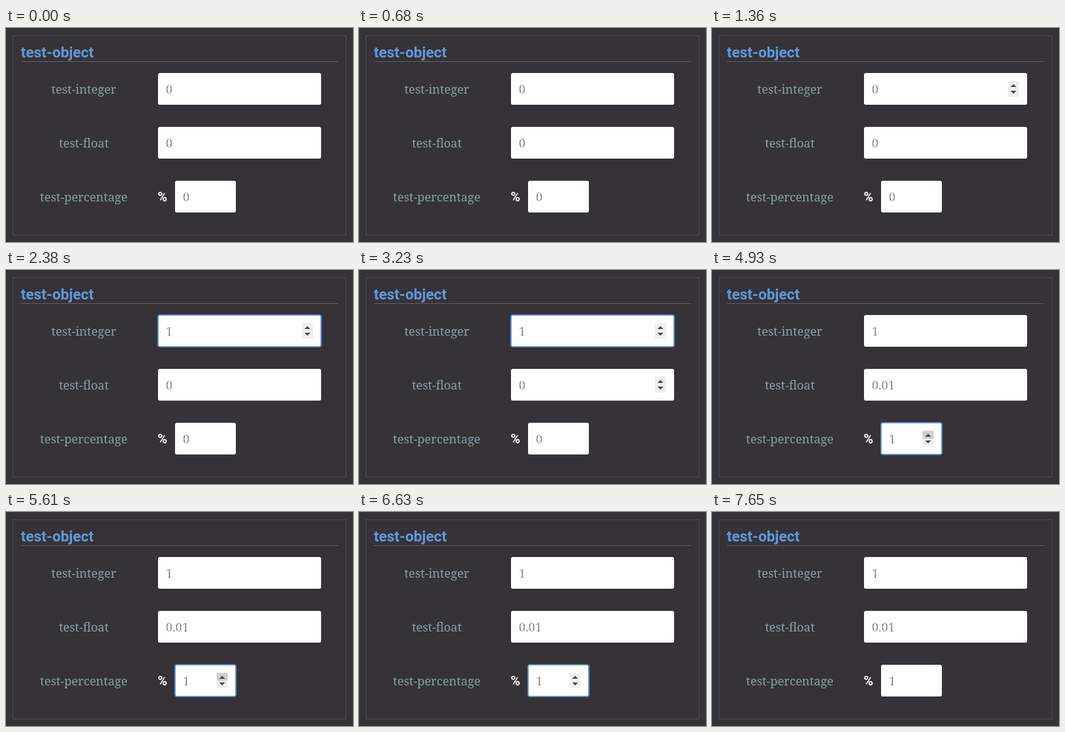
An HTML page that plays this animation: 468x290 px, repeating every 7820 ms.

```html
<!DOCTYPE html>
<html lang="en">
<head>
<meta charset="utf-8">
<title>Number inputs</title>
<style>
html, body { margin: 0; width: 100%; height: 100%; overflow: hidden; background: #353337; }
svg { display: block; width: 468px; height: 290px; }
.title { font: 700 20px Roboto, sans-serif; fill: #6098dc; }
.label { font: 400 16.2px "Roboto Slab", "Noto Serif", serif; fill: #8c9eab; text-anchor: middle; }
/* The pale outline thins the digits to a light weight */
.value { font: 300 16px "Roboto Slab", "Noto Serif", serif; fill: #55535a; stroke: #fefefe; stroke-width: .5; }
.unit { font: 700 17.5px Roboto, sans-serif; fill: #fff; }
.box { fill: #fefefe; }
.focus .box { stroke: #5b8fd6; stroke-width: 1.6; }
.arrow { fill: #48484a; }
</style>
</head>
<body>
<svg viewBox="0 0 468 290">
  <rect width="468" height="290" fill="#353337"/>
  <rect x="9.5" y="10.5" width="449" height="270" fill="none" stroke="#4c4a50"/>
  <text class="title" x="20" y="40">test-object</text>
  <path d="M20 45.5H448" stroke="#5c5a60"/>
  <g id="fields"></g>
  <text class="unit" x="204.5" y="235">%</text>
</svg>
<script>
const LOOP = 7820, STEP = 170;

// Times in ms: spinner shown, value changed, focus, and upper button darkened
const fields = [
  { label: "test-integer", x: 205, y: 61, w: 220, next: "1",
    show: [1020, 3570], change: 2040, focus: [2040, 3570], press: [1700, 2380] },
  { label: "test-float", x: 205, y: 134, w: 220, next: "0.01",
    show: [2720, 4930], change: 3570, focus: [3570, 4930], press: [3400, 3910] },
  { label: "test-percentage", x: 228, y: 207, w: 82, next: "1",
    show: [4080, 7310], change: 4930, focus: [4930, 7310], press: [4760, 6120] }
];

const markup = ({ label, x, y, w }) => `
  <text class="label" x="105" y="${y + 28}">${label}</text>
  <g class="field" transform="translate(${x} ${y})">
    <rect class="box" width="${w}" height="43" rx="2.5"/>
    <text class="value" x="10.5" y="28">0</text>
    <g class="spinner" transform="translate(${w - 26} 11)">
      <rect width="15" height="21" fill="#efefef"/>
      <rect class="upper" width="15" height="10.5" fill="#cfcfcf"/>
      <path class="arrow" d="M3.5 8 7.5 4 11.5 8ZM3.5 13H11.5L7.5 17Z"/>
    </g>
  </g>`;

document.getElementById("fields").innerHTML = fields.map(markup).join("");

const groups = [...document.querySelectorAll(".field")];
const parts = groups.map(group => ({
  group,
  value: group.querySelector(".value"),
  spinner: group.querySelector(".spinner"),
  upper: group.querySelector(".upper")
}));

const within = (t, [from, to]) => t >= from && t < to;
const setVisible = (el, on) => el.setAttribute("display", on ? "inline" : "none");

function draw(now) {
  const t = Math.floor(now % LOOP / STEP) * STEP;
  fields.forEach((field, i) => {
    const { group, value, spinner, upper } = parts[i];
    group.classList.toggle("focus", within(t, field.focus));
    value.textContent = t >= field.change ? field.next : "0";
    setVisible(spinner, within(t, field.show));
    setVisible(upper, within(t, field.press));
  });
}

const start = performance.now();
function tick() {
  draw(performance.now() - start);
  requestAnimationFrame(tick);
}
tick();
</script>
</body>
</html>
```
